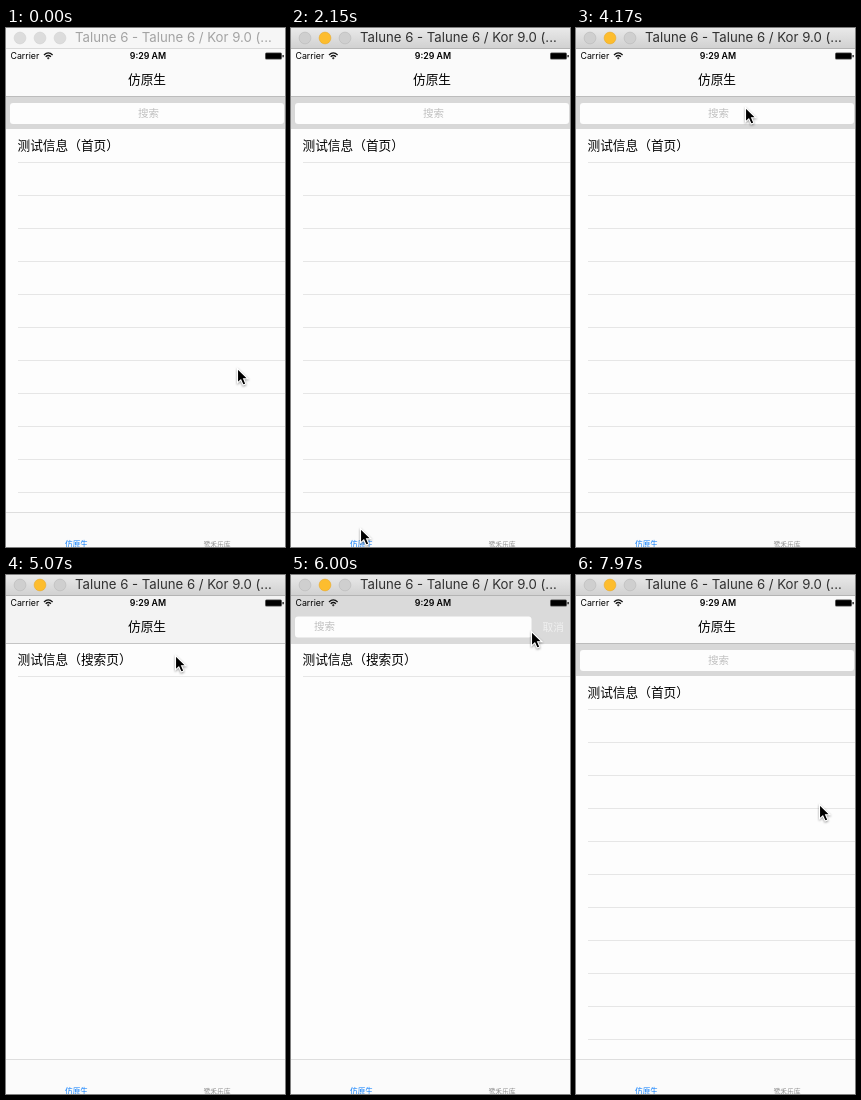
These frames come from a looping animation (279x519 px, 8000 ms). An HTML page:

```html
<!DOCTYPE html>
<html lang="zh-CN">
<meta charset="utf-8">
<style>
  html, body { margin: 0; width: 100%; height: 100%; overflow: hidden; background: #fdfdfd }
  svg { display: block }
  text { font-family: "Noto Sans CJK SC", "Noto Sans CJK", sans-serif; font-size: 12.7px }
  .latin { font-family: Inter, "Liberation Sans", sans-serif; font-size: 8.8px }
  .mid { text-anchor: middle }
  .hint { font-size: 10.5px; fill: #c0c0c0 }
  .tab { font-size: 7.6px }
  #cursor { filter: drop-shadow(0 1px 1px #0006) }
</style>
<svg width="279" height="519" viewBox="0 0 279 519">
  <defs>
    <linearGradient id="chrome" x2="0" y2="1">
      <stop stop-color="#e9e9e9"/><stop offset="1" stop-color="#d0d0d0"/>
    </linearGradient>
  </defs>
  <rect width="279" height="519" fill="#fdfdfd"/>

  <g id="home">
    <rect y="68" width="279" height="33" fill="#d8d8d8"/>
    <rect x="4" y="75" width="274" height="21" rx="3" fill="#fdfdfd"/>
    <text class="mid hint" x="142.5" y="88.7">搜索</text>
    <text x="11.5" y="122">测试信息（首页）</text>
    <path id="rules" stroke="#e6e6e6"/>
  </g>
  <g id="results">
    <text x="11.5" y="89">测试信息（搜索页）</text>
    <path d="M12 101.5H279" stroke="#e6e6e6"/>
  </g>

  <rect y="21" width="279" height="47" fill="#fafafa"/>
  <path d="M0 68.5H279" stroke="#bcbcbc"/>
  <rect id="bar" y="21" width="279" height="48" fill="#dadada"/>
  <text class="mid" id="heading" x="141" y="56" font-weight="500">仿原生</text>
  <g id="field">
    <rect x="4" y="41.5" width="236.5" height="21" rx="3" fill="#fdfdfd"/>
    <text class="hint" id="hint" y="55.2">搜索</text>
    <text x="251.5" y="55.6" style="font-size:10.7px" fill="#f0f0f0">取消</text>
  </g>

  <text class="latin" x="4.5" y="31.3">Carrier</text>
  <g fill="none" stroke="#111" stroke-width="1.3">
    <path d="M38 27Q42.3 22.8 46.6 27M39.7 28.8Q42.3 26.3 44.9 28.8"/>
    <circle cx="42.3" cy="30.3" r=".4"/>
  </g>
  <text class="latin mid" x="142" y="31.3" font-weight="600">9:29 AM</text>
  <rect x="259" y="24.5" width="17" height="7" rx="1.5" fill="#555"/>
  <path d="M260 25.3h15v5.4h-15zM276.5 27h1.2v2.2h-1.2z"/>

  <rect y="484" width="279" height="35" fill="#fbfbfb"/>
  <path d="M0 484.5H279" stroke="#dedede"/>
  <text class="tab mid" x="70.5" y="518.7" fill="#0a7dfc">仿原生</text>
  <text class="tab mid" x="211" y="518.7" fill="#929292" style="font-size:6.8px">鹭禾乐库</text>

  <rect id="title" width="279" height="21"/>
  <path id="edge" d="M0 20.5H279"/>
  <g stroke-width=".6" id="lights">
    <circle cx="14" cy="10" r="5.9"/>
    <circle cx="34" cy="10" r="5.9"/>
    <circle cx="54" cy="10" r="5.9"/>
  </g>
  <text class="latin" id="caption" x="69" y="14.4" style="font-size:13.2px">Talune 6 - Talune 6 / Kor 9.0 (...</text>

  <path id="cursor" d="M.5 -.5V13.8L3.8 10.8 6.1 16 8.8 14.9 6.6 9.8H11Z" stroke="#fff" stroke-width="1.1"/>
</svg>
<script>
const el = id => document.getElementById(id);
const set = (id, attrs) => { for (const k in attrs) el(id).setAttribute(k, attrs[k]); };
const clamp = v => Math.max(0, Math.min(1, v));
const ease = p => p * p * (3 - 2 * p);

// Pointer moves: first step, last step, number of steps, destination
const moves = [
  [720, 1140, 8, 69, 501],
  [2930, 3230, 6, 74, 309],
  [3410, 3520, 3, 122, 114],
  [3580, 4170, 10, 169, 80],
  [4230, 4231, 1, 169, 81],
  [5700, 5820, 3, 205, 71],
  [5880, 6000, 3, 240, 57],
  [6060, 6360, 5, 258, 52],
  [7790, 7970, 4, 243, 230]
];

let rules = '';
for (let y = 134.5; y < 470; y += 33) rules += `M12 ${y}H279`;
set('rules', { d: rules });

function pointer(t) {
  let x = 231, y = 341;
  for (const [start, end, n, toX, toY] of moves) {
    if (t < start) break;
    const step = 1 + Math.floor((t - start) / (end - start) * (n - 1));
    const p = ease(Math.min(1, step / n));
    x += (toX - x) * p;
    y += (toY - y) * p;
  }
  return `translate(${Math.round(x)} ${Math.round(y)})`;
}

function draw(now) {
  const t = now % 8000, active = t >= 2150;
  const searching = t >= 5070 && t < 6600;
  const open = clamp((t - 5070) / 400), close = clamp((6710 - t) / 165);
  const shown = t < 5070 ? 0 : Math.min(open, close);

  set('title', { fill: active ? 'url(#chrome)' : '#f6f6f6' });
  set('edge', { stroke: active ? '#b4b4b4' : '#dadada' });
  set('caption', { fill: active ? '#303030' : '#a3a3a3' });
  [...el('lights').children].forEach((dot, i) => {
    const lit = active && i === 1;
    dot.setAttribute('fill', lit ? '#fdbd2e' : active ? '#cfcfcf' : '#dcdcdc');
    dot.setAttribute('stroke', lit ? '#e8a92c' : active ? '#b9b9b9' : '#d2d2d2');
  });

  set('home', { visibility: searching ? 'hidden' : 'visible' });
  set('results', { visibility: searching ? 'visible' : 'hidden' });
  set('bar', { opacity: t < 5070 || t >= 6710 ? 0 : Math.min(close, .25 + .75 * open) });
  set('heading', { opacity: 1 - shown });
  set('field', { opacity: shown });
  set('hint', { x: 23 + 108 * (1 - ease(shown)) });
  set('cursor', { transform: pointer(t) });
}

const begin = performance.now();
function tick() {
  draw(performance.now() - begin);
  requestAnimationFrame(tick);
}
tick();
</script>
</html>
```
